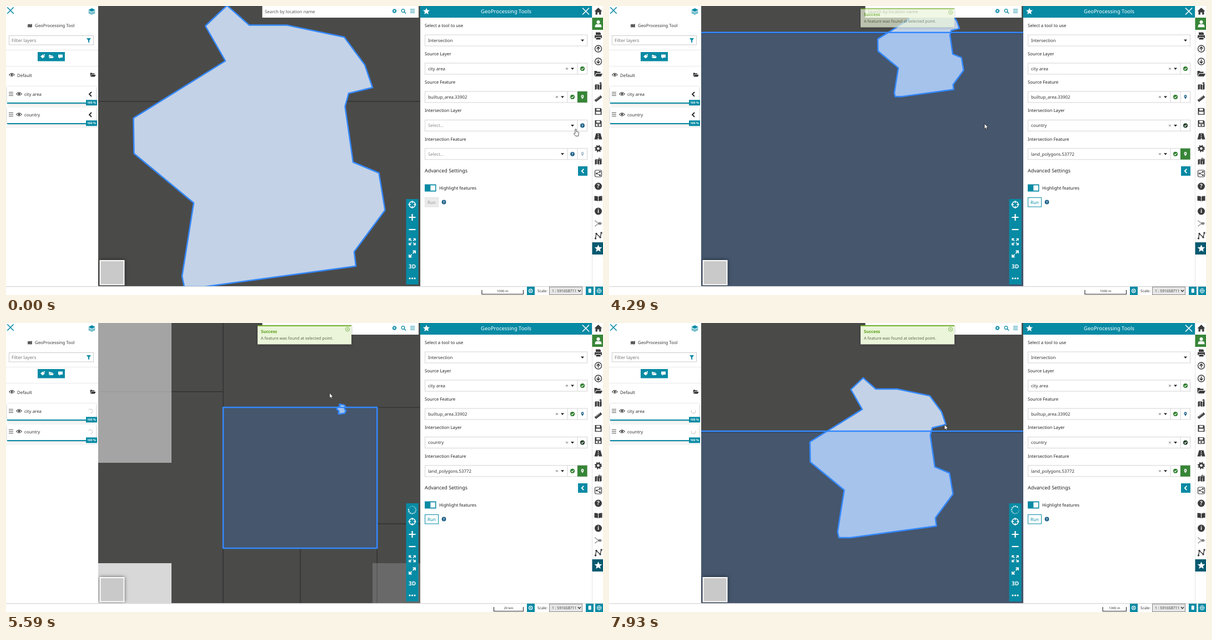
These frames come from a looping animation (1075x521 px, 8000 ms). An HTML page:

```html
<!DOCTYPE html>
<html lang="en">
<head>
<meta charset="utf-8">
<title>GeoProcessing Tools</title>
<style>
html, body { margin: 0; width: 100%; height: 100%; overflow: hidden; background: #fff; }
svg { display: block; }
text { font-family: "Noto Sans", "Open Sans", sans-serif; text-rendering: geometricPrecision; white-space: pre; }
#world * { vector-effect: non-scaling-stroke; }
.lift { filter: drop-shadow(0 1px 2px rgba(0, 0, 0, .25)); }
.deep { filter: drop-shadow(0 0 3px rgba(0, 0, 0, .6)); }
</style>
</head>
<body>
<svg id="stage" width="1075" height="521" viewBox="0 0 1075 521"></svg>
<script>
const TEAL = '#078aa4', GREEN = '#378537', DARK = '#3b3b3b', NAVY = '#1f6189', BLUE = '#3388ff', INK = '#333';

// ---- drawing helpers ----
const rect = (x, y, w, h, fill, more = '') => `<rect x="${x}" y="${y}" width="${w}" height="${h}" fill="${fill}" ${more}/>`;
const text = (x, y, s, size = 7.85, fill = INK, more = '') =>
  `<text x="${x}" y="${y + size * .36}" font-size="${size}" fill="${fill}" ${more}>${s}</text>`;
const MID = 'text-anchor="middle" ', MEDIUM = 'font-weight="500"', BOLD = 'font-weight="700"';
const line = (d, color, w = 1, more = '') => `<path d="${d}" fill="none" stroke="${color}" stroke-width="${w}" ${more}/>`;
const at = (x, y, body, k = 1) => `<g transform="translate(${x} ${y}) scale(${k})">${body}</g>`;
const fill = (d, color = DARK) => `<path d="${d}" fill="${color}" fill-rule="evenodd"/>`;
const disc = (r, color, more = '') => `<circle r="${r}" fill="${color}" ${more}/>`;
const ring = (r, color, w = 1.4, more = '') => disc(r, 'none', `stroke="${color}" stroke-width="${w}" ${more}`);
const group = (id, body) => `<g id="${id}">${body}</g>`;
const kind = (name, body) => `<g class="${name}">${body}</g>`;

// ---- icons, centred on 0,0 ----
const STAR = 'M0-6.8 2-2.3 6.8-1.9 3.1 1.3 4.2 6 0 3.5-4.2 6-3.1 1.3-6.8-1.9-2-2.3Z';
const PIN = 'M0 4.5Q-2.9.7-2.9-1.5a2.9 2.9 0 0 1 5.8 0Q2.9.7 0 4.5ZM0-2.7a1.2 1.2 0 1 0 .01 0Z';
const FOLDER = 'M-7 5V-5h4l1.5 1.5H4V-1H-4ZM-6 5-3.4 0H7.5L5 5Z';
const MAP = 'M-6-3-2.6-4.2V5L-6 6ZM-1.7-4.2 1.7-3V6L-1.7 5ZM2.6-3 6-5V5L2.6 6Z';
const SAVE = 'M-6-6H4.2L6-4.2V6H-6ZM-3.4-5V-1.6H3V-5ZM-4.2.6V4.8H4.2V.6Z';
const icon = {
  gear: c => ring(3.7, c, 2.8) + ring(5.6, c, 1.9, 'stroke-dasharray="2.2 2.2"'),
  help: c => disc(6.5, c) + text(0, -.2, '?', 10, '#fff', MID + BOLD),
  check: c => disc(6.5, c) + line('M-3.2.2-.9 2.6 3.4-2.2', '#fff', 1.9),
  eye: c => line('M-5.6 0Q0-6.4 5.6 0 0 6.4-5.6 0Z', c, 1.3) + disc(2, c),
  cross: (c, r, w) => line(`M${-r} ${-r} ${r} ${r}M${-r} ${r} ${r} ${-r}`, c, w),
  back: (c, k = 1) => line(`M${2 * k} ${-4 * k} ${-2 * k} 0 ${2 * k} ${4 * k}`, c, 1.8),
  menu: (c, r = 4.2) => line(`M${-r}-3H${r}M${-r} 0H${r}M${-r} 3H${r}`, c, 1.2),
  caret: () => fill('M-3-1.5H3L0 2Z', '#222'),
  layers: c => fill('M0-6 7-2.5 0 1-7-2.5Z', c) + line('M-6.5.3 0 3.5 6.5.3M-6.5 2.8 0 6 6.5 2.8', c, 1.3),
  arrow: c => ring(6, c) + line('M0 3.6V-3M-3 0 0-3.2 3 0', c, 1.6)
};

const sideIcons = [
  [9, fill('M-7 .6 0-6 7 .6H5V6.5H1.6V2.4H-1.6V6.5H-5V.6Z')],
  [32, fill('M0-6.2a3.1 3.1 0 1 0 .01 0ZM-6 6.2Q-6 .8-2.4.8H2.4Q6 .8 6 6.2Z', '#fff')],
  [54, fill('M-4.5-6.5H3L4.5-5V-2H-4.5ZM-6.5-1.2H6.5V4H4.8V2H-4.8V4H-6.5ZM-4 3H4V6.5H-4Z')],
  [77, icon.arrow(DARK)],
  [100, `<g transform="rotate(180)">${icon.arrow(DARK)}</g>`],
  [122, fill(FOLDER)],
  [145, fill(MAP) + line('M4-8V-4M2-6H6', DARK, 1.3)],
  [167, `<g transform="rotate(-38)">${rect(-7, -2.2, 14, 4.4, DARK)}${line('M-4-2.2V0M-1.3-2.2V0M1.3-2.2V0M4-2.2V0', '#fff', .8)}</g>`],
  [190, fill(SAVE)],
  [212, fill(SAVE) + line('M0 .8V4.6M-1.9 2.7H1.9', DARK, 1.2)],
  [235, fill('M-4-5.5H4L7 5.5H-7ZM-.6-4V-2H.6V-4ZM-.7-.5V1.6H.7V-.5ZM-.8 3V5.5H.8V3Z')],
  [257, icon.gear(DARK)],
  [280, fill(MAP) + at(2, -3.5, disc(2.8, '#fff') + fill(PIN), .7)],
  [302, rect(-6, -6, 12, 12, 'none', `rx="2" stroke="${DARK}" stroke-width="1.2"`) + line('M3-3-3 0 3 3', DARK) + fill('M3-4.6a1.6 1.6 0 1 0 .01 0ZM-3-1.6a1.6 1.6 0 1 0 .01 0ZM3 1.4a1.6 1.6 0 1 0 .01 0Z')],
  [325, icon.help(DARK)],
  [347, fill('M-7-4.5Q-3-5-.5-3.5V5Q-3 3.6-7 4ZM7-4.5Q3-5 .5-3.5V5Q3 3.6 7 4Z')],
  [370, disc(6.5, DARK) + text(0, -.2, 'i', 10, '#fff', MID + BOLD)],
  [392, line('M-6-5 1 0-6 5', DARK, 1.1, 'stroke-dasharray="2 1"') + at(3, 0, icon.eye(DARK), .6)],
  [414, line('M-5 5-3.5-3.5 3.5 3 5.5-5', DARK, 1.4) + [[-5, 5], [-3.5, -3.5], [3.5, 3], [5.5, -5]].map(p => at(...p, disc(1.7, DARK))).join('')],
  [437, fill(STAR, '#fff')]
];

// ---- map ----
const CITY = 'M398-1 359 36 395 99 229.5 202 230.5 266 338 355 317 487 321 506 358 506 630 469 627 443 682.5 368 671.5 301 625 281.5 610.5 181 617 157.5 660 147 646 106 609 56 506 34.5 438 34.5Z';
const L = -5533, R = 2270, TOP = 168, BOTTOM = 7317, FAR = 20000;
const GRID = `M${L} 172H${FAR}M${L}-${FAR}V${FAR}M-${FAR}-625H${L}M${L} ${BOTTOM}H${R}M-1621 ${BOTTOM}V${FAR}M${R} 172V${FAR}M${R} 6079H${FAR}`;
const HIGHLIGHT = `fill-opacity=".2" stroke="${BLUE}" stroke-width="2.5" stroke-linejoin="round"`;
const map = rect(166, 0, 580, 505, '#4a4a49') +
  group('world', line(GRID, '#323231', 1.4) + fill(CITY, '#e7e5e1') +
    `<path d="${CITY}" fill="${BLUE}" ${HIGHLIGHT}/>` +
    rect(L, TOP, R - L, BOTTOM - TOP, BLUE, `id="land" ${HIGHLIGHT}`)) +
  [[166, 0, 132, 252], [166, 433, 132, 72], [660, 433, 86, 72]].map((b, i) => rect(...b, '#ddd', `id="tile${i}"`)).join('');

const tools = [
  [358, ring(5.5, '#fff', 1.5) + line('M0-7V-2.5M0 7V2.5M-7 0H-2.5M7 0H2.5', '#fff', 1.5)],
  [381, line('M-6 0H6M0-6V6', '#fff', 2.2)],
  [403, line('M-6 0H6', '#fff', 2.2)],
  [425, line('M-5.5-2V-5.5H-2M2-5.5H5.5V-2M5.5 2V5.5H2M-2 5.5H-5.5V2M-5-5-1.5-1.5M5-5 1.5-1.5M5 5 1.5 1.5M-5 5-1.5 1.5', '#fff', 1.5)],
  [447, line('M1-5.5H5.5V-1M-1 5.5H-5.5V1M5-5 1-1M-5 5-1 1', '#fff', 1.8)],
  [469, text(0, 0, '3D', 10, '#fff', MID + BOLD)],
  [491, [-4.5, 0, 4.5].map(x => at(x, 0, disc(1.6, '#fff'))).join('')]
];
const mapTools = rect(720.5, 348, 22, 154, TEAL) + tools.map(([y, b]) => at(731.5, y, b)).join('') +
  group('mapSpin', rect(720.5, 325, 22, 23.5, TEAL) +
    at(731.5, 337, group('dots', [...Array(12)].map((_, i) =>
      `<circle cx="6.6" r="1.35" fill="#fff" opacity="${.15 + i * .07}" transform="rotate(${i * 30})"/>`).join('')))) +
  kind('deep', rect(169.5, 459, 43, 43.5, '#c9c9c9', 'stroke="#fff" stroke-width="2"'));

const search = rect(461.5, 0, 281.5, 21, '#fff') + text(466, 10, 'Search by location name', 7.9, '#555') +
  at(699.5, 9, icon.gear(TEAL), .62) + at(732, 9, icon.menu(TEAL)) +
  at(715, 8.5, ring(2.8, TEAL, 1.3) + line('M2 2 5 5', TEAL, 1.6));

const toast = group('toast', kind('lift', rect(453, 4, 169, 34.5, '#eaf5da')) + rect(453, 4, 169, 1.8, '#6dab1f') +
  text(459, 15.5, 'Success', 7.6, '#5a9e12', BOLD) + text(459, 27.3, 'A feature was found at selected point.', 7.33, '#5c6b4c') +
  at(615, 11.3, ring(3.7, '#86b95a', 1) + icon.cross('#86b95a', 1.5, 1)));

// ---- left panel ----
const layer = (y, name) => kind('lift', rect(2, y - 14, 160, 30, '#fff')) +
  at(9, y - 1, icon.menu('#555', 4)) + at(23.5, y - 1, icon.eye(INK), .85) + text(33, y, name) +
  kind('idle', at(152, y - .5, icon.back('#222'))) +
  kind('busy', at(152, y - .5, ring(3.8, '#c4c4c4', 1, 'class="turn" stroke-dasharray="15 9"'))) +
  rect(2, y + 14.5, 144, 2, TEAL) + rect(144, y + 9.8, 20, 10, TEAL) + text(154, y + 14.8, '100 %', 5.4, '#fff', MID + BOLD);
const left = rect(0, 0, 166, 505, '#fff') + at(8, 8, icon.cross(TEAL, 5.8, 1.6)) + at(154.5, 9.5, icon.layers(TEAL), .9) +
  at(43, 35, fill(MAP, INK), .62) + text(52, 35, 'GeoProcessing Tool', 7.75, INK, MEDIUM) +
  rect(5.5, 53.5, 152, 16.5, '#fff', 'stroke="#ccc"') + text(10, 62, 'Filter layers', 8.2, '#777') +
  at(149, 62, fill('M-4-4H4L1 0V4.5L-1 3V0Z', TEAL)) + line('M0 79.5H166M0 108.5H166', '#eaeaea') +
  rect(57, 83, 49, 16.5, TEAL) + at(66, 91, fill('M0-3.5 4 0 0 3.5-4 0ZM2-4H4V-2H2Z', '#fff')) +
  at(81.5, 91, fill(FOLDER, '#fff'), .6) + at(98, 91, fill('M-4-3.5H4V2H0L-2 4V2H-4Z', '#fff')) +
  at(10.5, 124, icon.eye(INK), .85) + text(20, 125, 'Default') + at(156.5, 124, fill(FOLDER, INK), .68) +
  layer(159.5, 'city area') + layer(196.5, 'country') + line('M0 218.5H166', '#e8e8e8');

// ---- right panel ----
const field = (y, ...splits) => rect(754.5, y - 10, 292, 20, '#fff', 'stroke="#d4d4d4"') +
  splits.map(x => line(`M${x} ${y - 10}V${y + 10}`, '#d4d4d4')).join('') +
  at((splits[0] || 1047) - 9, y, icon.caret());
const label = (y, s) => text(754, y, s, 7.85, '#222', MEDIUM);
const value = (y, s, x) => text(760, y, s) + at(x, y, icon.cross('#666', 1.8, .9));
const hint = (x, y) => at(x, y, icon.help(NAVY), .6);
const ok = (x, y, c = '#2e7d2e') => at(x, y, icon.check(c), .62);
const pin = (y, c) => at(1038, y, fill(PIN, c), .85);
const livePin = y => rect(1029, y - 10, 17.5, 20, GREEN) + pin(y, '#fff');
const select = y => text(760, y, 'Select...', 7.85, '#888');
const run = (bg, edge, ink) => rect(754.5, 345.5, 24, 16.5, bg, `stroke="${edge}"`) + text(766.5, 353.8, 'Run', 8, ink, MID);
const right = rect(746, 0, 309, 505, '#fff') + rect(745.5, 0, 309.5, 21, TEAL) + at(757, 9.5, fill(STAR, '#fff'), .9) +
  text(900.5, 9.7, 'GeoProcessing Tools', 9.4, '#fff', MID) + at(1044, 9.5, icon.cross('#fff', 6, 1.6)) +
  label(35, 'Select a tool to use') + field(62) + text(760, 62, 'Intersection') +
  label(86.3, 'Source Layer') + field(113, 1029) + value(113, 'city area', 1010) + ok(1038, 113) +
  label(137.5, 'Source Feature') + field(164, 1011, 1029) + value(164, 'builtup_area.33902', 992) + ok(1020, 164) +
  group('srcLive', livePin(164)) + group('srcIdle', pin(164, NAVY)) +
  label(188.5, 'Intersection Layer') + field(215.5, 1029) +
  group('layerEmpty', select(215.5) + hint(1038, 215.5)) +
  group('layerSet', value(215.5, 'country', 1010) + ok(1038, 215.5, '#1f3b24')) +
  group('focus', rect(754.5, 205.5, 274.5, 20, 'none', 'stroke="#7cbcc8"')) +
  label(240, 'Intersection Feature') + field(266.8, 1011, 1029) +
  group('featEmpty', select(266.8) + hint(1020, 266.8)) +
  group('featSet', value(266.8, 'land_polygons.53772', 992) + ok(1020, 266.8)) +
  group('pinOff', pin(266.8, '#a3b9c8')) + group('pinOn', pin(266.8, NAVY)) + group('pinLive', livePin(266.8)) +
  text(754, 296.8, 'Advanced Settings', 8.9, '#222', MEDIUM) + rect(1030, 289, 17, 17, TEAL) + at(1038.5, 297.5, icon.back('#fff', .9)) +
  rect(754, 321.5, 20.5, 13, TEAL) + rect(764.3, 323.3, 8.7, 9.4, '#fff') + text(780, 328.5, 'Highlight features', 7.9, '#222') +
  group('runOff', run('#ebebeb', '#e0e0e0', '#999')) + group('runOn', run('#fff', TEAL, TEAL)) +
  hint(788.5, 353.5) +
  group('menu', rect(754.5, 226, 274.5, 40.5, '#f5faff', 'stroke="#ccc"') + text(760, 246, 'country'));

const side = rect(1055, 0, 20, 505, '#fff') + line('M1055.5 0V505', '#e4e4e4') + rect(1055.5, 21, 19.5, 22, GREEN) +
  rect(1055.5, 426, 19.5, 22, '#065a70') + sideIcons.map(([y, b]) => at(1066.5, y, b)).join('');

const footer = rect(0, 505, 1075, 16, '#fff') + line('M0 505.5H1075', '#d9d9d9') + line('M0 506.5H1075', '#f0f0f0') +
  line('', '#333', 1.2, 'id="bar"') + text(895, 514.3, '', 5.9, INK, MID + 'id="dist"') +
  rect(938, 506, 14, 15, TEAL) + at(944.7, 513.5, ring(3.2, '#fff', 1.2) + disc(1.2, '#fff')) +
  text(957, 513.7, 'Scale:', 6.7) + rect(978.5, 506.5, 59, 14, '#e6e6e6', 'stroke="#8a8a8a"') +
  text(983, 513.5, '1 : 591658711', 6.8, '#444') + line('M1030 512 1032.5 514.8 1035 512', '#222', 1.2) +
  rect(1044, 506, 14, 15, TEAL) + rect(1048.7, 509.5, 5, 7.5, '#fff', 'rx="1"') + rect(1061, 506, 14, 15, TEAL) +
  at(1068, 513.5, ring(3.8, '#fff', 1) + line('M-3.8 0H3.8M0-3.8V3.8', '#fff', .9));

const pointer = (id, d) => `<path id="${id}" d="${d}" fill="#fff" stroke="#222" stroke-width=".8"/>`;
const cursor = group('cursor',
  pointer('arrow', 'M0 0V9.5L2.2 7.5 3.7 10.8 5.2 10.2 3.8 7H6.7Z') +
  pointer('hand', 'M-1.1 1a1.1 1.1 0 0 1 2.2 0V4.6L4.4 5.4Q5.6 5.8 5.4 7.2L4.6 12.5H-.2L-3.6 8.2Q-3.2 6.6-1.1 8Z'));

const $ = id => document.getElementById(id);
const all = name => document.querySelectorAll(name);
$('stage').innerHTML = map + search + mapTools + left + right + side + footer + toast + cursor;

// ---- motion ----
const FIT = .07106;
const closer = (t, k) => [t, FIT * k, 626.6 - 49.4 * k, 164.2 - 8.1 * k];
const views = [                       // start, scale, x, y
  [-999, 1, 0, 0], [4210, FIT, 572, -13.4], [4950, FIT / 2, 587.6, 146],
  [5800, FIT, 577.2, 156.1], closer(6400, 2), closer(6680, 4), closer(7100, 8)
];
const path = [                        // time, x, y
  [0, 1026, 222], [70, 1024, 220], [140, 1022, 217], [690, 1022, 217], [1110, 977, 238], [1350, 977, 238],
  [1900, 1046, 257], [2060, 1046, 257], [2200, 1037, 265], [3130, 1037, 265], [3330, 723, 223], [3880, 676, 212],
  [4570, 676, 212], [4870, 604.5, 305], [5250, 604.5, 305], [5560, 582.5, 126], [5600, 582.5, 126], [5750, 598, 136],
  [5930, 598, 136], [6110, 645.5, 139], [6180, 645.5, 139], [6370, 627, 164], [7400, 627, 164], [7700, 604, 183], [8000, 604, 183]
];
const clamp = v => Math.max(0, Math.min(1, v));
const mix = (a, b, p) => a + (b - a) * p;
const show = (el, on) => { el.style.display = on ? '' : 'none'; };
const between = (t, a, b) => t >= a && t < b;

function drawMap(t) {
  const i = views.findLastIndex(v => t >= v[0]), to = views[i], from = views[Math.max(0, i - 1)];
  const p = 1 - (1 - clamp((t - to[0]) / 240)) ** 3;
  const [s, x, y] = [1, 2, 3].map(n => mix(from[n], to[n], p));
  $('world').setAttribute('transform', `translate(${x} ${y}) scale(${s})`);

  // longest round distance that fits the scale bar
  const km = 74.6 * (p > .9 ? to : from)[1], most = 78 / km, unit = 10 ** Math.floor(Math.log10(most));
  const d = unit * [5, 3, 2, 1].find(n => n * unit <= most), x0 = 931.5 - d * km;
  $('bar').setAttribute('d', `M${x0} 512V519.5H931.5V512`);
  $('dist').setAttribute('x', (x0 + 931.5) / 2);
  $('dist').textContent = d > 1 ? d + ' km' : d * 1000 + ' m';

  // tiles fade in over the bare background
  [5514, 5585, 5433].forEach((start, n) =>
    $('tile' + n).setAttribute('opacity', t < 5050 ? 0 : 1 - clamp((t - start) / 200)));
}

function draw(t) {
  drawMap(t);
  const chosen = t >= 1250, picking = t >= 2600, found = t >= 4210;
  const loading = between(t, 4570, 4880) || between(t, 5050, 6090) || t >= 6450;
  const on = {
    menu: between(t, 340, 1250), focus: between(t, 340, 2600),
    layerEmpty: !chosen, layerSet: chosen, runOff: !chosen, runOn: chosen,
    srcLive: !picking, srcIdle: picking, pinOff: !chosen, pinOn: chosen && !picking, pinLive: picking,
    featEmpty: !found, featSet: found, land: found, toast: found, mapSpin: loading
  };
  on.hand = t < 1400 || between(t, 2130, 3160);
  on.arrow = !on.hand;
  for (const id in on) show($(id), on[id]);
  $('toast').setAttribute('opacity', clamp((t - 4150) / 200));
  all('.busy').forEach(e => show(e, loading));
  all('.idle').forEach(e => show(e, !loading));
  const spin = `rotate(${t * .36 % 360})`;
  [$('dots'), ...all('.turn')].forEach(e => e.setAttribute('transform', spin));

  const i = path.findIndex(k => k[0] > t), a = path[i - 1], b = path[i], p = (t - a[0]) / (b[0] - a[0]);
  $('cursor').setAttribute('transform', `translate(${mix(a[1], b[1], p)} ${mix(a[2], b[2], p)})`);
}

function tick() {
  draw(performance.now() % 8000);
  requestAnimationFrame(tick);
}
tick();
</script>
</body>
</html>
```
